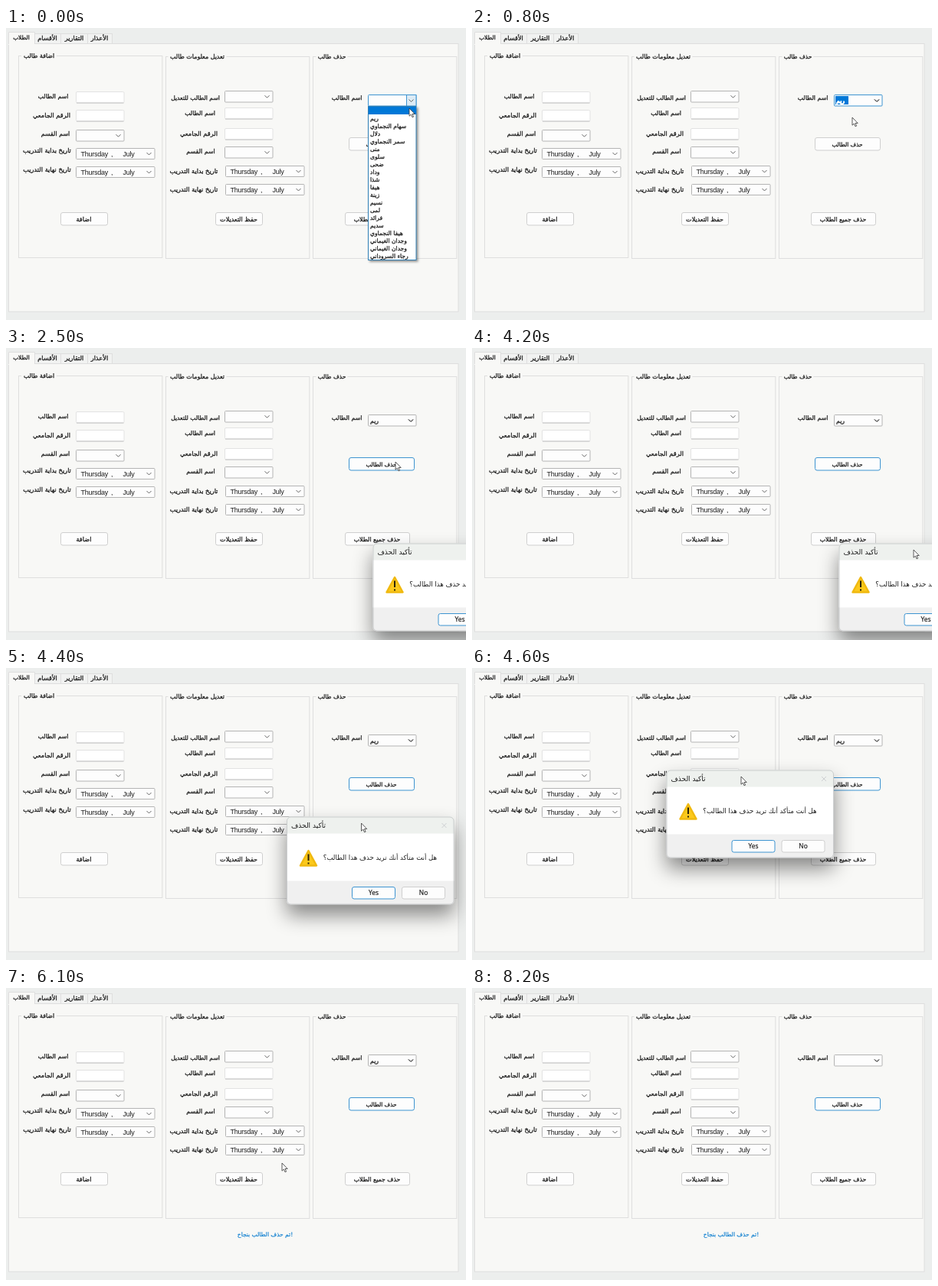
Write an HTML page that moves like this. It is 600 px wide and 382 px high and loops after 8.3 s.

```html
<!DOCTYPE html>
<html lang="ar">
<head>
<meta charset="utf-8">
<title>حذف طالب</title>
<style>
html, body { margin: 0; width: 100%; height: 100%; overflow: hidden; background: #eceeed; }
svg { display: block; width: 600px; height: 382px; }
text { font: 7.6px "DejaVu Sans", sans-serif; fill: #1c1c1c; text-anchor: middle; direction: rtl; }
.b { stroke: #1c1c1c; stroke-width: .28px; }
.l { text-anchor: start; direction: ltr; }
.date { font-family: "Liberation Sans", sans-serif; letter-spacing: -.25px; }
.ui { font-family: "Open Sans", sans-serif; direction: ltr; stroke: #1c1c1c; stroke-width: .2px; }
.msg { fill: #0f7fd0; stroke: #0f7fd0; stroke-width: .2px; }
.box { fill: #fff; stroke: #e2e2e2; }
.combo { fill: #fdfdfd; stroke: #b4b4b4; }
.btn { fill: #fdfdfd; stroke: #cfcfcf; }
.group { fill: none; stroke: #dedede; }
.arrow { fill: none; stroke: #555; stroke-width: .9px; }
.focus { stroke: #3d94d1; }
.hot { fill: #dcebf5; stroke: #3d94d1; }
.lit { fill: #fff; stroke: #fff; }
.drop { filter: drop-shadow(2px 2px 1.5px rgba(0,0,0,.4)); }
.cast { filter: drop-shadow(0 14px 13px rgba(0,0,0,.45)); }
</style>
</head>
<body>
<svg id="stage" viewBox="0 0 600 382"></svg>
<script>
const LOOP = 8300, STEP = 100;
const stage = document.getElementById('stage');

function el(tag, attrs, parent = stage, content) {
  const e = document.createElementNS('http://www.w3.org/2000/svg', tag);
  for (const k in attrs) e.setAttribute(k, attrs[k]);
  if (content) e.textContent = content;
  parent.appendChild(e);
  return e;
}
const rect = (cls, x, y, w, h, r = 0, parent = stage) =>
  el('rect', { class: cls, x: x + .5, y: y + .5, width: w, height: h, rx: r }, parent);
const fill = (color, x, y, w, h, parent = stage) =>
  el('rect', { fill: color, x, y, width: w, height: h }, parent);
const text = (s, x, y, size = 7.6, cls = 'b', parent = stage) =>
  el('text', { class: cls, x, y: y + 2.5, style: `font-size:${size}px` }, parent, s);
const arrow = (x, y) => el('path', { class: 'arrow', d: `M${x - 3} ${y - 1.5}l3 3l3-3` });

function input(x, y, w = 62.5, h = 14.5) {
  rect('box', x, y, w, h, 1.5);
  fill('#c4c4c4', x + 1, y + h, w - 1, 1);
}
function combo(x, y, w = 62.5, h = 14.5) {
  const r = rect('combo', x, y, w, h, 1);
  arrow(x + w - 7, y + h / 2 + .5);
  return r;
}
function dateBox(x, y) {
  combo(x, y, 102.5, 14);
  [['Thursday', 6.5], [',', 46], ['July', 61.5]].forEach(([s, dx]) =>
    text(s, x + dx, y + 8, 9, 'l date'));
}
function button(s, x, y, w, size) {
  const r = rect('btn', x, y, w, 16.5, 2.5);
  text(s, x + w / 2, y + 9, size);
  return r;
}
function group(title, x, y, size, center, width) {
  rect('group', x, y, 187.3, 264);
  fill('#f8f8f6', center - width / 2 - 1, y - 1, width + 2, 3);
  text(title, center, y, size);
}

// Tabs and page
fill('#f8f8f6', 3, 20, 587, 351);
rect('group', 3, 20, 586.5, 350.5);
[['الأقسام', 37, 34, 54], ['التقارير', 71, 35, 89], ['الأعذار', 106, 32, 122]].forEach(([s, x, w, c]) => {
  fill('#f1f2f1', x, 7, w, 13);
  rect('group', x, 7, w, 13);
  text(s, c, 13, 8.2);
});
fill('#f8f8f6', 3, 5, 34, 17);
el('path', { class: 'group', d: 'M3.5 21V5.5H37.5V20.5' });
text('الطلاب', 20, 12.5, 7.4);

// Add a student
const NAME = 'اسم الطالب', ID = 'الرقم الجامعي', DEPT = 'اسم القسم';
const START = 'تاريخ بداية التدريب', END = 'تاريخ نهاية التدريب';
group('اضافة طالب', 16, 36, 7.8, 43, 44);
text(NAME, 61.5, 89, 7.8);
text(ID, 59.5, 114, 8.2);
text(DEPT, 64.5, 138.5, 7.9);
text(START, 53.5, 160, 8.2);
text(END, 53.5, 185, 8.2);
input(91, 83);
input(91, 107);
combo(91, 133);
dateBox(91, 157);
dateBox(91, 181);
button('اضافة', 71, 241, 61, 8.2);

// Edit a student
group('تعديل معلومات طالب', 208, 37, 7.9, 249.5, 74);
text('اسم الطالب للتعديل', 247, 91, 7.6);
text(NAME, 253, 111, 7.8);
text(ID, 251.5, 138, 8.2);
text(DEPT, 254, 161.5, 7.9);
text(START, 245, 187, 8.2);
text(END, 245, 211, 8.2);
combo(285, 82);
input(285, 104);
input(285, 131);
combo(285, 155);
dateBox(286, 180);
dateBox(286, 204);
button('حفظ التعديلات', 273, 241, 61, 8);

// Delete a student
group('حذف طالب', 400, 37, 7.5, 425, 39);
text(NAME, 444.5, 91, 7.8);
const picker = combo(472, 87);
const openMark = rect('hot', 522, 87, 12.5, 14.5);
arrow(528.5, 95);
const mark = fill('#0078d7', 474, 89, 17, 11);
const picked = text('ريم', 475, 95, 7.8, 'b l');
const remove = button('حذف الطالب', 447, 143, 85, 7.3);
button('حذف جميع الطلاب', 442, 241, 84, 7.8);
const done = text('!تم حذف الطالب بنجاح', 338, 322, 7.5, 'msg');

// Open list
const names = ['', 'ريم', 'سهام النجماوي', 'دلال', 'سمر النجماوي', 'منى', 'سلوى', 'ضحى', 'وداد', 'شذا',
  'هيفا', 'زينة', 'نسيم', 'لمى', 'فرائد', 'سديم', 'هيفا النجماوي', 'وجدان الغيماني', 'وجدان الغيماني', 'رجاء السروداني'];
const list = el('g', {});
el('rect', { class: 'drop', x: 472.5, y: 102.5, width: 62.5, height: 201, fill: '#fff', stroke: '#2f7fb5' }, list);
const bar = fill('#0078d7', 473, 103, 62, 10, list);
const rows = names.map((s, i) => text(s, 475, 108 + i * 10, 7.6, 'b l', list));

// Confirmation, placed relative to its own corner
const dialog = el('g', {});
el('rect', { class: 'cast', width: 218.5, height: 115, rx: 5, fill: '#f0f0f0' }, dialog);
el('path', { fill: '#eef1ee', d: 'M0 22V5Q0 0 5 0H213.5Q218.5 0 218.5 5V22Z' }, dialog);
fill('#fff', 0, 22, 218.5, 62, dialog);
el('rect', { x: .5, y: .5, width: 217.5, height: 114, rx: 5, fill: 'none', stroke: '#b9bcbd', 'stroke-width': .7 }, dialog);
text('تأكيد الحذف', 28.5, 11.5, 9, '', dialog);
el('path', { d: 'M202.5 8.5l6 6m0-6l-6 6', stroke: '#c4c7ca', 'stroke-width': .8 }, dialog);
el('path', { d: 'M28.5 44.5L39 64H18Z', fill: '#fcc91c', stroke: '#f0b90f', 'stroke-width': 2.5, 'stroke-linejoin': 'round' }, dialog);
el('path', { d: 'M28.5 49V57.5M28.5 60V62', stroke: '#2b2208', 'stroke-width': 2 }, dialog);
text('هل أنت متأكد أنك تريد حذف هذا الطالب؟', 122, 53.5, 8.6, '', dialog);
[['Yes', 85, 'btn focus'], ['No', 150, 'btn']].forEach(([s, x, cls]) => {
  rect(cls, x, 91.5, 56, 15.5, 2.5, dialog);
  text(s, x + 28.5, 100, 8.4, 'ui', dialog);
});

const cursor = el('path', {
  d: 'M0 0V10.2L2.4 8.1L4 11.8L5.6 11.1L4 7.5H7.2Z',
  fill: '#fff', stroke: '#333', 'stroke-width': .8, 'stroke-linejoin': 'round'
});

// Pointer stops: time, x, y
const path = [
  [0, 526, 105], [200, 526, 105], [600, 496, 117], [800, 496, 117], [1500, 508, 152],
  [1800, 508, 152], [2000, 508, 149], [2800, 508, 149], [3600, 576, 264], [4200, 576, 264],
  [4600, 351, 142], [4800, 351, 142], [5400, 360, 229], [LOOP, 360, 229]
];
function pointer(t) {
  const i = path.findIndex(p => p[0] > t);
  const [t0, x0, y0] = path[i - 1], [t1, x1, y1] = path[i];
  const u = (t - t0) / (t1 - t0), k = u * u * (3 - 2 * u);
  return [x0 + (x1 - x0) * k, y0 + (y1 - y0) * k];
}
const show = (e, on) => e.setAttribute('visibility', on ? 'visible' : 'hidden');

function draw(t) {
  const [x, y] = pointer(t);
  const open = t < 700, active = t < 1900;
  const row = y > 113 ? 1 : 0;

  show(list, open);
  show(openMark, open);
  bar.setAttribute('y', 103 + row * 10);
  rows.forEach((r, i) => r.setAttribute('class', i === row ? 'l lit' : 'b l'));

  picker.setAttribute('class', active ? 'combo focus' : 'combo');
  show(picked, !open && t < 6700);
  show(mark, !open && active);
  picked.setAttribute('class', active ? 'l lit' : 'b l');

  const hover = !open && active && y > 143;
  remove.setAttribute('class', hover ? 'hot' : active ? 'btn' : 'btn focus');

  // The dialog follows the pointer while it is dragged
  show(dialog, t >= 2100 && t < 5600);
  const [dx, dy] = pointer(Math.min(Math.max(t, 4200), 4600));
  dialog.setAttribute('transform', `translate(${dx - 97.5} ${dy - 8.5})`);
  show(done, t >= 5700);

  show(cursor, t < 6700);
  cursor.setAttribute('transform', `translate(${x} ${y})`);
}
function tick() {
  draw(Math.floor(performance.now() % LOOP / STEP) * STEP);
  requestAnimationFrame(tick);
}
tick();
</script>
</body>
</html>
```
